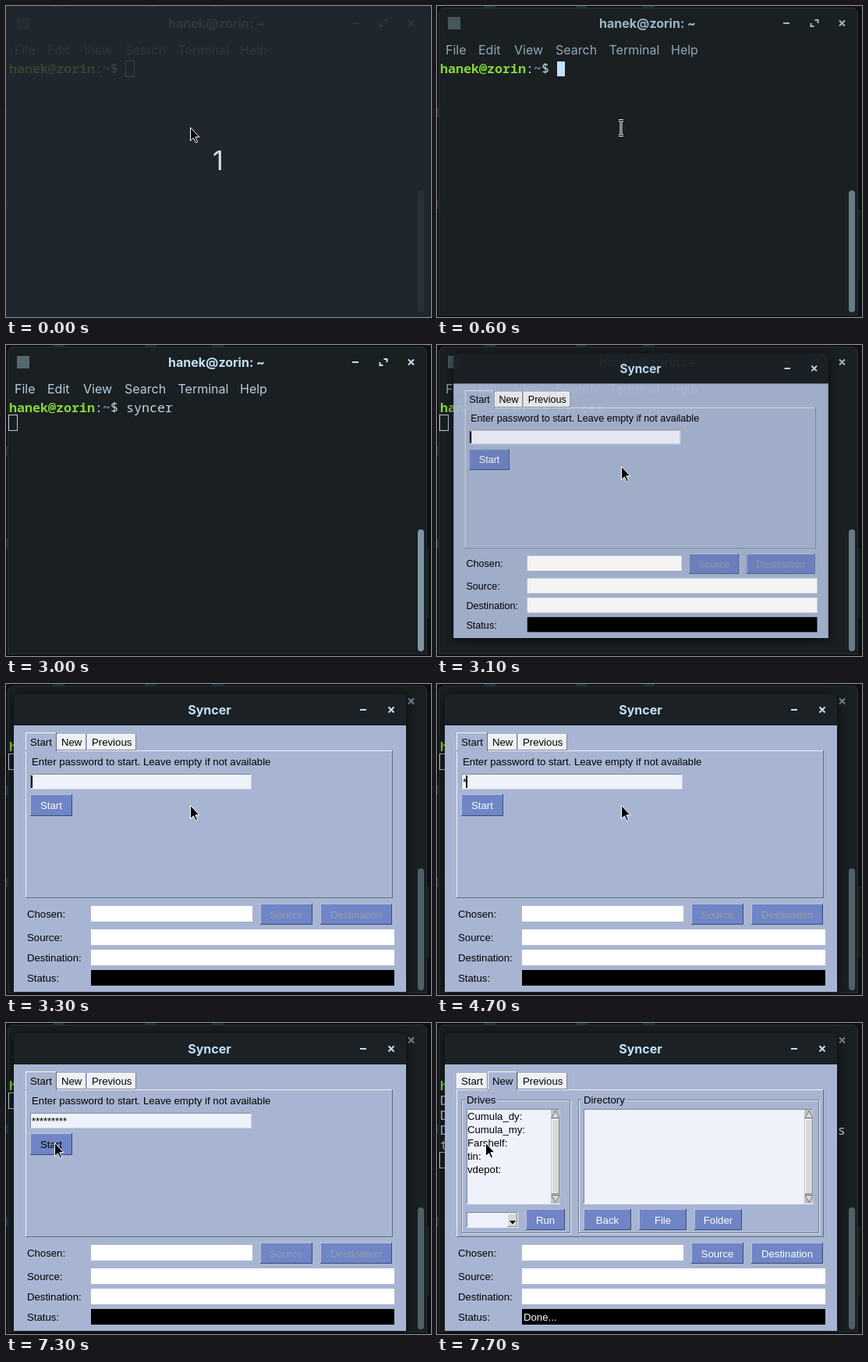
Animation of 545x398 px, one loop 8000 ms. Source, as an HTML page:

```html
<!DOCTYPE html>
<html lang="en">
<head>
<meta charset="utf-8">
<title>Syncer demo</title>
<style>
  html, body { margin: 0; height: 100%; overflow: hidden; background: #0c1012; }
  svg { display: block; width: 100vw; height: 100vh; }
  text { font: 13.2px "Liberation Sans", Arial, sans-serif; white-space: pre; }
  .ui { font: 16px Inter, sans-serif; fill: #b4cfdf; }
  .title { font: bold 16px Inter, sans-serif; fill: #c0e3f8; text-anchor: middle; }
  .mono { font: 16.667px "Noto Sans Mono", monospace; fill: #c0d8e6; }
  .user { font-weight: bold; fill: #86d638; }
  .path { font-weight: bold; fill: #6d98c8; }
  .count { font: 34px Inter, sans-serif; fill: #dde0e2; text-anchor: middle; }
  .btn { fill: #fff; text-anchor: middle; }
  .off { fill: #969dae; }
  .hover { fill: #000; }
  .stars { letter-spacing: -.135px; }
  .icon { fill: none; stroke: #c0e3f8; stroke-width: 2; }
  .shadow { filter: drop-shadow(0 2px 7px rgba(0, 0, 0, .65)); }
</style>
</head>
<body>
<svg id="stage" viewBox="0 0 545 398"></svg>
<script>
const LOOP = 8000, STEP = 100;
const BODY = '#a8b5d2', BLUE = '#6f85c5', FIELD = '#eff2fb', BAR = '#1b2125';
const command = 'syncer', keyTimes = [1000, 1400, 1700, 1800, 2100, 2200];
const starTimes = [4700, 4900, 5000, 5200, 5400, 5600, 5800, 6000, 6100];
const caretOff = [[3700, 4000], [4600, 4700], [6500, 6700], [7300, LOOP]];

const stage = document.getElementById('stage');
const passed = (times, t) => times.filter(k => k <= t).length;
const ramp = (t, from, to) => Math.min(1, Math.max(0, (t - from) / (to - from)));
const smooth = k => k * k * (3 - 2 * k);

const rect = (x, y, w, h, fill, more = '') =>
  `<rect x="${x}" y="${y}" width="${w}" height="${h}" fill="${fill}" ${more}/>`;
const text = (x, y, s, cls = '') => `<text x="${x}" y="${y}" class="${cls}">${s}</text>`;
const path = (d, more) => `<path d="${d}" ${more}/>`;
const group = (s, more) => `<g ${more}>${s}</g>`;
const bevel = (x, y, w, h, fill, light, dark) =>
  rect(x, y, w, h, dark) + rect(x, y, w - 1, h - 1, light) + rect(x + 1, y + 1, w - 2, h - 2, fill);

const minimize = (x, y) => path(`M${x - 4} ${y}h8`, 'class="icon"');
const close = (x, y) => path(`M${x - 3.5} ${y - 3.5}l7 7m0-7l-7 7`, 'class="icon"');

function button(x, y, w, h, label, cls = '', down = false) {
  const edges = down ? ['#3e4b76', '#b4c0e4'] : ['#b4c0e4', '#3e4b76'];
  return bevel(x, y, w, h, BLUE, ...edges) + text(x + w / 2, y + h / 2 + 5, label, 'btn ' + cls);
}

function tab(x, w, label, active) {
  return (active ? bevel(x, 62, w, 24, BODY, '#f4f6fa', '#5f687c') + rect(x + 1, 84, w - 2, 3, BODY)
                 : bevel(x, 64, w, 21, '#eff0f4', '#fff', '#7a8294')) + text(x + 6, 79, label);
}

function frame(x, y, w, h, label, labelWidth) {
  const line = (d, c) => rect(x + d, y + d, w, h, 'none', `stroke="${c}"`);
  return line(1.5, '#e6eaf3') + line(.5, '#727b90') +
    rect(x + 5, y - 3, labelWidth, 8, BODY) + text(x + 7, y + 5, label);
}

function scrollList(x, w, items) {
  const s = x + w, mid = s + 6;
  const arrow = d => path(d, 'fill="#d9d9d9" stroke="#777"');
  return bevel(x, 110, w + 12, 122, FIELD, '#7c8599', '#f4f6fa') +
    items.map((item, i) => text(x + 1, 124 + 17 * i, item)).join('') +
    rect(s, 111, 12, 120, '#bfc2c8') +
    arrow(`M${mid} 112.5l5 9h-10z`) + arrow(`M${mid} 229.5l5-9h-10z`) +
    bevel(s + 1, 123, 10, 96, '#d9d9d9', '#fff', '#808080');
}

function cursor(x, y, hollow) {
  return hollow ? rect(x - .5, y - .5, 11, 20, 'none', 'stroke="#b4cfdf"') : rect(x, y, 10, 19, '#c0e3f8');
}

function desktop() {
  return rect(0, 0, 545, 398, '#0c1012') +
    [60, 178, 264].map(x => rect(x, 0, 15, 3, '#11303e')).join('') +
    [130, 248].map(y => rect(0, y, 3, 12, '#11303e')).join('') +
    rect(540, 260, 3, 90, '#142112');
}

function terminal(t) {
  const focus = t < 2000 ? ramp(t, 400, 800) : 1 - ramp(t, 3000, 3200);
  const typed = passed(keyTimes, t), done = t >= 7700;
  const menu = { File: 11, Edit: 53, View: 99, Search: 152, Terminal: 220.5, Help: 300 };
  const chrome = text(270, 28, 'hanek@zorin: ~', 'title') +
    minimize(448, 22) + close(519.5, 22) +
    path('M484.5 18h4v4M483.5 26h-4v-4', 'class="icon"') +
    Object.entries(menu).map(([s, x]) => text(x, 62, s, 'ui')).join('') +
    rect(14, 14, 16, 16, '#53676f') +
    rect(528, 236, 8, 156, '#7d96a5', 'rx="4"');
  const output = ['D', 'D', 'D' + ' '.repeat(50) + 's', 't'];
  const row = done ? 5 : t >= 2400 ? 1 : 0;
  return path('M2.5 395.5V10q0-7.5 7.5-7.5h522q7.5 0 7.5 7.5v385.5z', 'fill="#1a1f22" stroke="#2a3236"') +
    group(chrome, `opacity="${.55 + .45 * focus}"`) +
    text(4, 86, '<tspan class="user">hanek@zorin</tspan>:<tspan class="path">~</tspan>$', 'mono') +
    text(154, 86, command.slice(0, typed), 'mono') +
    (done ? output.map((s, i) => text(4, 105 + 19 * i, s, 'mono')).join('') : '') +
    cursor(row ? 4 : 154 + 10 * typed, 71 + 19 * row, t < 500 || t >= 3000);
}

function startPage(t) {
  const stars = passed(starTimes, t);
  const blink = caretOff.some(([a, b]) => t >= a && t < b);
  return text(33, 104, 'Enter password to start. Leave empty if not available') +
    bevel(31, 115, 284, 20, FIELD, '#818a9f', '#c9d0e0') +
    text(33, 130, '*'.repeat(stars), 'stars') +
    (blink ? '' : rect(32 + 5 * stars, 117, 2, 16, '#000')) +
    button(31, 141, 54, 28, 'Start', t >= 7300 ? 'hover' : '', t >= 7500);
}

function newPage() {
  return frame(31, 98, 139, 170, 'Drives', 42) + frame(181, 98, 308, 170, 'Directory', 57) +
    scrollList(38, 108, ['Cumula_dy:', 'Cumula_my:', 'Farshelf:', 'tin:', 'vdepot:']) +
    scrollList(188, 283, []) +
    bevel(38, 242, 66, 20, FIELD, '#7c8599', '#f4f6fa') +
    bevel(90, 243, 13, 18, '#d9d9d9', '#fff', '#808080') +
    path('M93 253h8l-4 4.5z', '') +
    button(114, 238, 50, 27, 'Run') + button(188, 238, 61, 27, 'Back') +
    button(259, 238, 61, 27, 'File') + button(330, 238, 61, 27, 'Folder');
}

function dialog(t) {
  const ready = t >= 7700, k = ramp(t, 3100, 3300);
  const scale = 1 - .0445 * (1 - k) ** 2, fade = .95 + .05 * k;
  const state = ready ? '' : 'off';
  const field = (y, w, fill) => rect(109, y, w, 20, fill);
  const parts = rect(10, 53, 503, 341, BODY) +
    path('M10 53V19q0-6 6-6h491q6 0 6 6v34z', `fill="${BAR}"`) +
    text(261, 39, 'Syncer', 'title') + minimize(458, 33) + close(494, 33) +
    bevel(25, 85, 471, 189, BODY, '#eef1f7', '#626b80') +
    tab(25, 40, 'Start', !ready) + tab(65, 38, 'New', ready) + tab(104, 63, 'Previous') +
    (ready ? newPage() : startPage(t)) +
    text(27, 299, 'Chosen:') + field(284, 207, '#fff') +
    button(326, 281, 67, 27, 'Source', state) + button(403, 281, 92, 27, 'Destination', state) +
    text(27, 329, 'Source:') + field(314, 389, '#fff') +
    text(27, 355, 'Destination:') + field(340, 389, '#fff') +
    text(27, 381, 'Status:') + field(366, 389, '#000') +
    (ready ? `<g fill="#fff">${text(111, 381, 'Done...')}</g>` : '');
  return group(parts, `class="shadow" opacity="${fade}"
    transform="translate(261.5 -33) scale(${scale}) translate(-261.5 33)"`);
}

function pointer(t) {
  if (t >= 100 && t < 1000) {
    const beam = 'M233 146.5h6m-3 0v19m-3 0h6';
    return path(beam, 'fill="none" stroke="#fff" stroke-width="3"') + path(beam, 'fill="none" stroke="#000"');
  }
  if (t >= 1000 && t < 3100) return '';
  const k = smooth(ramp(t, 7000, 7300));
  return path('M.5 .5v17l4-3.7 2.8 6 2.3-1-2.7-6.1h5.1z',
    `stroke="#fff" transform="translate(${236 - 174 * k} ${155 - 2 * k})"`);
}

function scene(t) {
  const countdown = t < 100;
  return desktop() + terminal(t) +
    (t >= 3100 ? dialog(t) : '') +
    (countdown ? rect(0, 0, 545, 398, '#212830', 'opacity=".84"') + text(272, 210, '1', 'count') : '') +
    pointer(t);
}

const begin = performance.now();
let shown = -1;
function draw() {
  const t = Math.floor((performance.now() - begin) % LOOP / STEP) * STEP;
  if (t !== shown) stage.innerHTML = scene(shown = t);
  requestAnimationFrame(draw);
}
draw();
</script>
</body>
</html>
```
